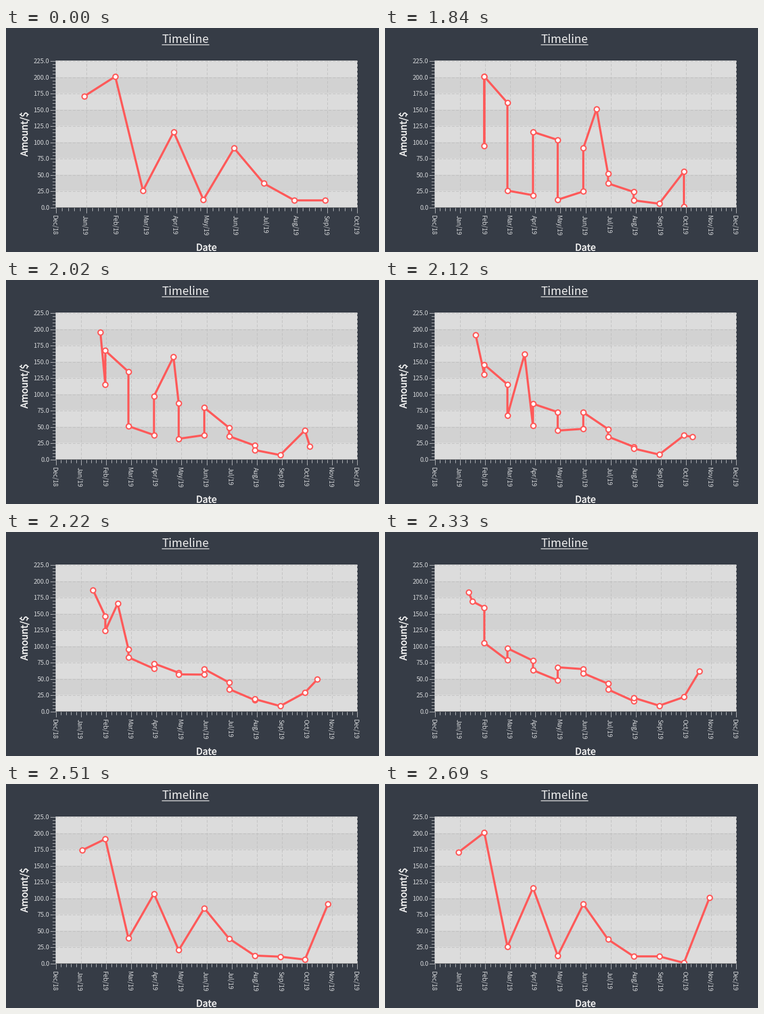
Recreate the animation shown at these times as a matplotlib script. Size 700 by 420 pixels, loop 3950 ms.

```python
import numpy as np
import matplotlib.pyplot as plt
from matplotlib.animation import FuncAnimation
from matplotlib.collections import LineCollection
from matplotlib.patches import Rectangle
from matplotlib.patheffects import withStroke

W, H, DPI = 700, 420, 100
PX = 72 / DPI
TICK_MS, LOOP_MS = 10, 3950

BACK, LIGHT, DARK = "#363c46", "#dcdcdc", "#d2d2d2"
GRID, AXIS, TICK, RED = "#bebebe", "#8c8c8c", "#c4c6c9", "#ff5a5a"
LABEL, HEAD = "#d6d8da", "#ececec"
FONT = "Noto Sans CJK JP"

LEFT, RIGHT, TOP, BOTTOM = 93.5, 658.5, 61.5, 336.5
MONTHS = "Dec Jan Feb Mar Apr May Jun Jul Aug Sep Oct Nov Dec".split()
FIRST_DAYS = np.cumsum([0, 31, 28, 31, 30, 31, 30, 31, 31, 30, 31])
AMOUNTS = np.array([170, 200, 25, 115, 11, 90, 36, 10, 10, 0, 100])
STRAY_START = np.array([397, 152])

# screen time and the matching moment of the transition
STEPS = [(1840, 0), (1940, 89), (2020, 178), (2120, 259), (2220, 340),
         (2330, 411), (2410, 482), (2510, 579), (2610, 645), (2690, 700)]
ADD_MS, REMOVE_MS = 700, 500


def points(span, count):
    x = LEFT + (FIRST_DAYS[:count] + 29) * (RIGHT - LEFT) / span
    y = 335.4 - AMOUNTS[:count] * 275 / 225
    return np.column_stack([x, y])


def ease(t):
    t = min(max(t, 0), 1)
    if t < 0.2:
        return 3.125 * t * t
    if t > 0.8:
        return 1 - 3.125 * (1 - t) ** 2
    return 1.25 * t - 0.125


def between(a, b, x):
    return a[1] + (b[1] - a[1]) * (x - a[0]) / (b[0] - a[0])


def snap(start, stop, count):
    """Evenly spaced pixel centres."""
    return np.floor(np.linspace(start, stop, count)) + 0.5


SHORT = points(304, 9)
FULL = points(365, 11)

# new points grow from the line joining their neighbours
born = FULL.copy()
for i in range(1, 10):
    born[i, 1] = between(FULL[i - 1], FULL[i + 1], FULL[i, 0])
born[0], born[10] = FULL[1], FULL[9]

# old points collapse one after another onto such a line
gone = FULL[:8].copy()
for i in range(1, 8):
    gone[i, 1] = between(gone[i - 1], FULL[i + 1], FULL[i, 0])
leaving = FULL[:8].copy()
leaving[0] = STRAY_START


def curve(ms):
    if ms < STEPS[0][0]:
        return SHORT
    clock = [c for at, c in STEPS if at <= ms][-1]
    pts = born + (FULL - born) * ease(clock / ADD_MS)
    if clock < REMOVE_MS:
        old = leaving + (gone - leaving) * ease(clock / REMOVE_MS)
        pts = np.vstack([pts, old])
        pts = pts[np.argsort(np.round(pts[:, 0], 3), kind="stable")]
    return pts


fig = plt.figure(figsize=(W / DPI, H / DPI), dpi=DPI, facecolor=BACK)
ax = fig.add_axes([0, 0, 1, 1])
ax.set(xlim=(0, W), ylim=(H, 0))
ax.axis("off")


def lines(segs, color, width=1, z=2, dash=None):
    style = (0, dash) if dash else "solid"
    return ax.add_collection(LineCollection(
        segs, colors=color, linewidths=width * PX, linestyles=style,
        zorder=z, capstyle="butt"), autolim=False)


def label(x, y, s, size, color=LABEL, **kw):
    return ax.text(x, y, s, family=FONT, fontsize=size * PX, color=color,
                   rotation_mode="anchor", **kw)


def axis_name(x, y, s, **kw):
    # a thin outline gives a weight between regular and bold
    label(x, y, s, 17.8, HEAD, ha="center", **kw).set_path_effects(
        [withStroke(linewidth=0.55 * PX, foreground=HEAD)])


rows = snap(BOTTOM, TOP, 10)
edges = rows - 0.5
for k in range(9):
    ax.add_patch(Rectangle((93, edges[k + 1]), 566, edges[k] - edges[k + 1],
                           lw=0, zorder=1, fc=DARK if k % 2 else LIGHT))

DASH = (5, 3)
lines([[(93, y), (659, y)] for y in rows[1:]], GRID, dash=DASH)
lines([[(83, y), (93, y)] for y in rows], TICK)
lines([[(87, y), (93, y)] for y in snap(BOTTOM, TOP, 46)], TICK)
lines([[(92.5, 61), (92.5, 337)]], TICK, z=6)
lines([[(93, 335.5), (659, 335.5)]], AXIS, z=6)
for k, y in enumerate(rows):
    label(81.5, y + 4.6, f"{25 * k:.1f}", 11.8, ha="right")

label(336.5, 27.7, "Timeline", 21.7, HEAD, ha="center")
lines([[(292, 31), (381, 31)]], HEAD, 1.4)
axis_name(376, 417.7, "Date")
axis_name(40.5, 199, "Amount/$", rotation=90)

columns = lines([], GRID, dash=DASH)
major, minor = lines([], TICK), lines([], TICK)
names = [label(0, 351, m + "/19", 11.6, rotation=-90) for m in MONTHS]
names[0].set_text("Dec/18")

line, = ax.plot([], [], color=RED, lw=4 * PX, marker="o", ms=9.6 * PX,
                mfc="white", mec=RED, mew=2.5 * PX, zorder=5,
                solid_joinstyle="round")
line.set_clip_path(Rectangle((93, 61), 566, 275, transform=ax.transData))


def set_months(count):
    xs = snap(LEFT, RIGHT, count + 1)
    columns.set_segments([[(x, 336), (x, 61)] for x in xs[1:]])
    major.set_segments([[(x, 337), (x, 347)] for x in xs])
    minor.set_segments([[(x, 337), (x, 343)]
                        for x in snap(LEFT, RIGHT, 5 * count + 1)])
    for k, name in enumerate(names):
        name.set_visible(k <= count)
        if k <= count:
            name.set_x(xs[k] - 6.4)


def draw(i):
    ms = i * TICK_MS
    set_months(10 if ms < STEPS[0][0] else 12)
    line.set_data(*curve(ms).T)
    return line, columns, major, minor, *names


anim = FuncAnimation(fig, draw, frames=LOOP_MS // TICK_MS, interval=TICK_MS,
                     repeat=True, repeat_delay=0, blit=False)
plt.show()
```
